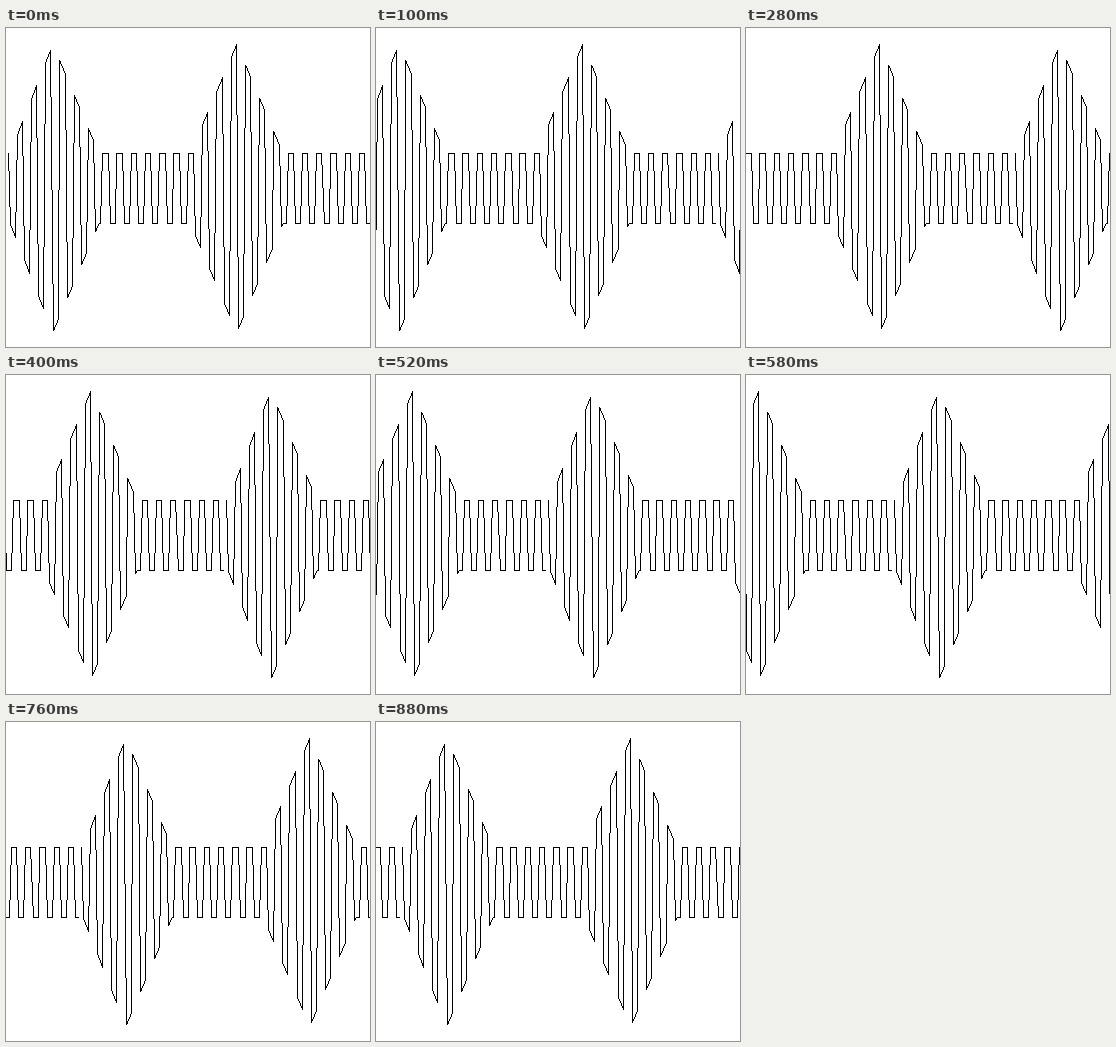
Recreate the animation shown at these times as a matplotlib script. Size 364x319 px, loop 940 ms.

```python
import numpy as np
import matplotlib.pyplot as plt
from matplotlib.animation import FuncAnimation

W, H, DPI = 364, 319, 64
MID, BASE, PEAK = 160, 35, 144    # centre line, flat and highest amplitude
START, HALF = 2.6, 7.13           # first edge and length of a half cycle
BURST = 13                        # half cycles per burst and per pause
STEPS, TICK, LOOP = 15, 20, 940


def amplitude(x, k):
    """Triangular bursts alternate with a flat carrier."""
    burst, pause = divmod(k // BURST, 2)
    if pause:
        return np.full(len(x), BASE)
    top = 46.2 + 184 * burst
    rise = 2.56 - 0.22 * burst
    slope = np.where(x < top, rise, 2.36)
    return np.maximum(BASE, PEAK - slope * abs(x - top))


def wave_points():
    """Square carrier, first half cycle low, with slightly slanted edges."""
    points = [(2, MID - BASE)]
    for k in range(int((W - START) / HALF) + 1):
        low = k % 2 == 0
        edge = START + HALF * k
        left = round(edge + (1.2 if low else 0.9))
        right = round(edge + HALF - 0.9)
        x = np.arange(left, min(right, W - 1) + 1)
        y = MID + (1 if low else -1) * amplitude(x, k)
        points.extend(zip(x, np.rint(y)))
    return points


def stroke(image, a, b):
    """Hard one-pixel line between two points."""
    n = int(max(abs(b[0] - a[0]), abs(b[1] - a[1]))) + 1
    x, y = (np.floor(np.linspace(p, q, n) + 0.5).astype(int)
            for p, q in zip(a, b))
    image[y, x] = 0


wave = np.ones((H, W))
points = wave_points()
for a, b in zip(points, points[1:]):
    stroke(wave, a, b)

fig = plt.figure(figsize=(W / DPI, H / DPI), dpi=DPI, facecolor="white")
ax = fig.add_axes([0, 0, 1, 1])
ax.axis("off")
view = ax.imshow(wave, cmap="gray", vmin=0, vmax=1, aspect="auto",
                 interpolation="nearest")


def draw(i):
    t = i * TICK
    # The first pose is held for 100 ms, every other one for 60 ms
    step = 0 if t < 100 else (t - 100) // 60 + 1
    view.set_data(np.roll(wave, -round(step * W / STEPS), axis=1))
    return view,


anim = FuncAnimation(fig, draw, frames=LOOP // TICK, interval=TICK,
                     repeat=True, repeat_delay=0)
plt.show()
```
